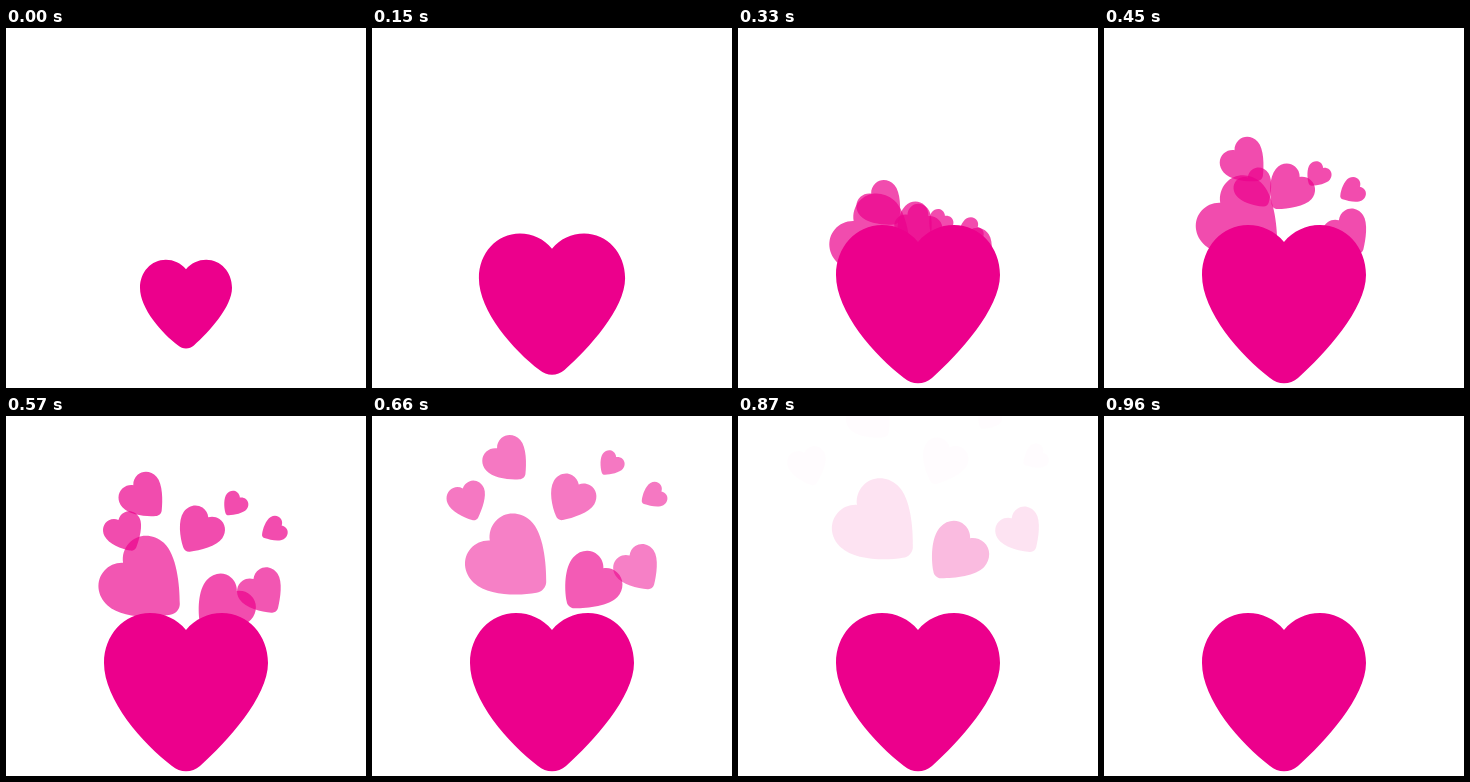
Write an HTML page with a canvas that moves like this. It is 360 by 360 pixels and loops after 990 ms.

```html
<!DOCTYPE html>
<html lang="en">
<head>
<meta charset="utf-8">
<title>Heart burst</title>
<style>
  html, body { margin: 0; width: 100%; height: 100%; overflow: hidden; background: #fff; }
  canvas { display: block; width: 360px; height: 360px; }
</style>
</head>
<body>
<canvas id="stage" width="360" height="360"></canvas>
<script>
const ctx = document.getElementById('stage').getContext('2d');
const LOOP = 990, STEP = 30, PINK = '#ec008c';

// Heart outline, 164 x 158, centred on the origin; the right flank is a little flatter.
const heart = new Path2D(`M0-62 C-9-73-22-79-36-79 C-62-79-82-57-82-29
  C-82 8-43 52-14 74 C-6 81 6 81 14 74
  C41 50 82 5 82-29 C82-57 62-79 36-79 C22-79 9-73 0-62Z`);

const clamp = v => Math.min(1, Math.max(0, v));
const span = (t, a, b) => clamp((t - a) / (b - a));
const mix = (a, b, p) => a + (b - a) * p;
const linear = p => p;
const sine = p => (1 - Math.cos(Math.PI * p)) / 2;
const easeIn = p => p * p;
const easeOut = p => 1 - (1 - p) ** 2;

// Groups share their travel, fade and growth times and easings.
const early = { move: [180, 870], fade: [590, 875], grow: [180, 300], ease: sine, dim: linear };
const middle = { move: [245, 935], fade: [550, 930], grow: [180, 300], ease: sine, dim: linear };
const late = { move: [430, 960], fade: [540, 960], grow: [390, 430], ease: easeOut, dim: easeIn };

// Each end of a path is x, y, tilt in degrees.
const floaters = [
  { group: middle, from: [131, 210.5, -49], to: [134, 100.5, -47], size: 0.513 },
  { group: early, from: [142, 196, -42], to: [130, -1, -42], size: 0.28 },
  { group: early, from: [189, 213, -42], to: [69, 46, -17], size: 0.24 },
  { group: early, from: [179, 215.5, 48], to: [207, 41.5, 25], size: 0.285 },
  { group: early, from: [197, 217, 38], to: [252, 0, 38], size: 0.153 },
  { group: early, from: [226, 222.5, 60], to: [299.5, 40, 60], size: 0.157 },
  { group: middle, from: [231, 225, -34], to: [281, 109, -34], size: 0.279 },
  { group: late, from: [220, 233, 42], to: [222.5, 130, 42], size: 0.362 }
];

function drawHeart(x, y, size, tilt = 0, alpha = 1, drop = 0) {
  if (size <= 0 || alpha <= 0) return;
  ctx.save();
  ctx.globalAlpha = alpha;
  ctx.translate(x, y);
  ctx.rotate(tilt * Math.PI / 180);
  ctx.scale(size, size);
  ctx.translate(0, drop);
  ctx.fillStyle = PINK;
  ctx.fill(heart);
  ctx.restore();
}

function drawFloater({ group, from, to, size }, t) {
  const p = group.ease(span(t, ...group.move));
  const [x, y, tilt] = from.map((v, i) => mix(v, to[i], p));
  const alpha = 0.7 * (1 - group.dim(span(t, ...group.fade)));
  const grown = size * easeOut(span(t, ...group.grow));
  drawHeart(x, y, grown, tilt, alpha, 22);
}

function mainSize(t) {
  const peak = 246;
  return t < peak
    ? mix(0.561, 1.055, sine(t / peak))
    : mix(1.055, 1, sine(span(t, peak, 330)));
}

function render(now) {
  const t = Math.floor((now % LOOP) / STEP) * STEP;
  ctx.fillStyle = '#fff';
  ctx.fillRect(0, 0, 360, 360);
  floaters.forEach(f => drawFloater(f, t));
  drawHeart(180, 276, mainSize(t));
}

const start = performance.now();
function tick() {
  render(performance.now() - start);
  requestAnimationFrame(tick);
}
tick();
</script>
</body>
</html>
```
